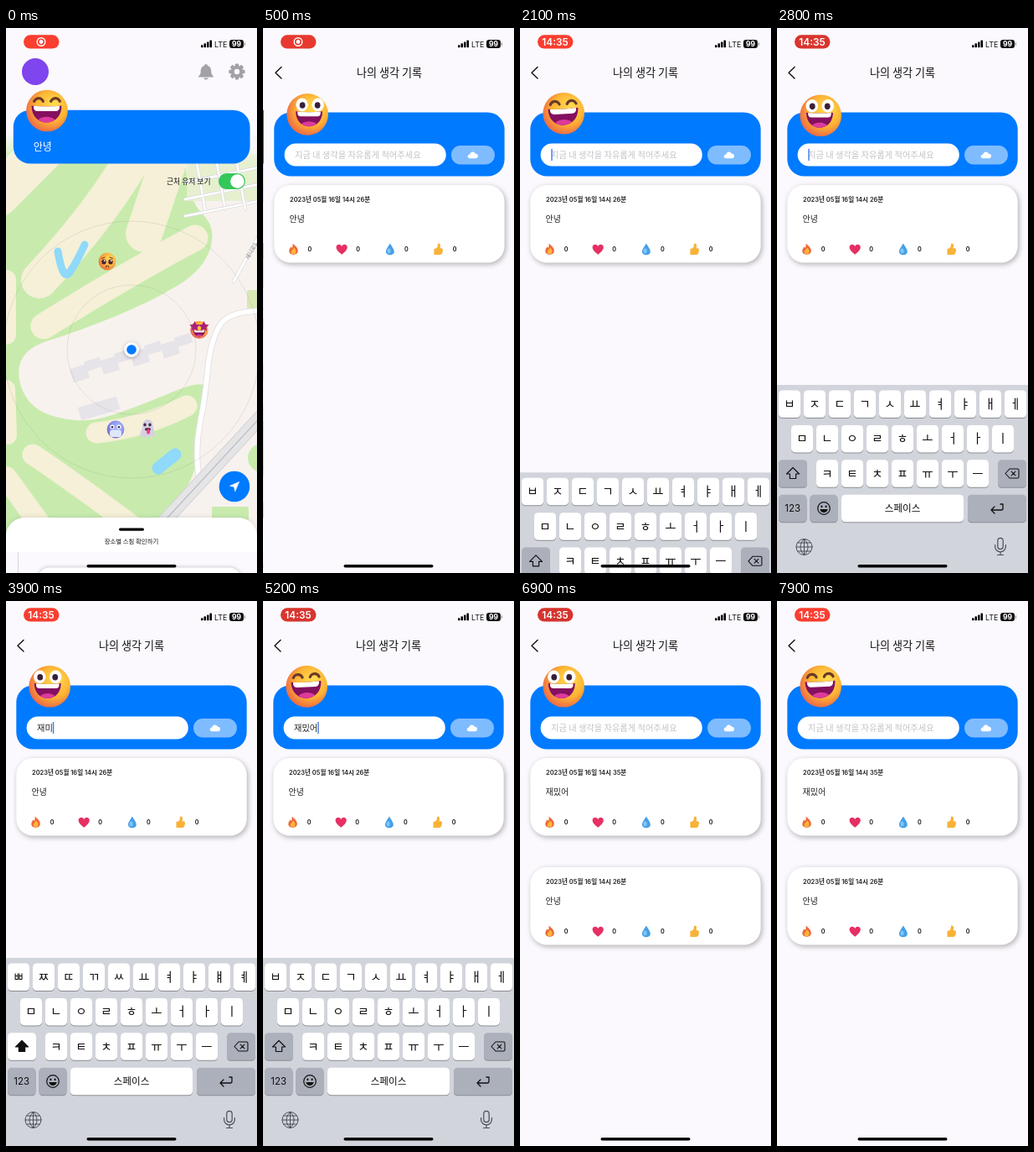
An HTML page with a canvas for the animation above (8000 ms loop, 300x649 px).

```html
<!DOCTYPE html>
<html lang="ko">
<head>
<meta charset="utf-8">
<style>
html,body{margin:0;width:100%;height:100%;overflow:hidden;background:#fbf9fd}
canvas{display:block;width:300px;height:649px}
</style>
</head>
<body>
<canvas id="stage"></canvas>
<script>
const W = 300, H = 649, LOOP = 8000, TAU = Math.PI * 2;
const BLUE = '#007aff', PAPER = '#fbf9fd', INK = '#111';
const KR = '"Noto Sans CJK KR","Noto Sans CJK",sans-serif';
const UI = 'Inter,"Noto Sans CJK KR","Noto Sans CJK",sans-serif';
const cv = document.getElementById('stage'), c = cv.getContext('2d');
const dpr = window.devicePixelRatio || 1;
cv.width = W * dpr; cv.height = H * dpr;

const smooth = v => { v = Math.max(0, Math.min(1, v)); return v * v * (3 - 2 * v); };

function rr(x, y, w, h, r, fill) {
  c.beginPath(); c.roundRect(x, y, w, h, r);
  c.fillStyle = fill; c.fill();
}
function disc(x, y, r, fill, ry = r) {
  c.beginPath(); c.ellipse(x, y, r, ry, 0, 0, TAU);
  c.fillStyle = fill; c.fill();
}
function arc(x, y, r, width, color, from = 0, to = TAU) {
  c.beginPath(); c.arc(x, y, r, from, to);
  c.lineWidth = width; c.strokeStyle = color; c.lineCap = 'round'; c.stroke();
}
function text(s, x, y, size, color = INK, weight = 400, align = 'left', fam = KR) {
  c.font = `${weight} ${size}px ${fam}`;
  c.textAlign = align; c.fillStyle = color; c.fillText(s, x, y);
}
// stroke through a few points, rounded at the inner ones
function line(pts, width, color) {
  c.beginPath(); c.moveTo(pts[0], pts[1]);
  let i = 2;
  for (; i < pts.length - 2; i += 2) {
    const x = pts[i], y = pts[i + 1], last = i === pts.length - 4, k = last ? 1 : .5;
    c.quadraticCurveTo(x, y, x + (pts[i + 2] - x) * k, y + (pts[i + 3] - y) * k);
  }
  if (pts.length === 4) c.lineTo(pts[2], pts[3]);
  c.lineWidth = width; c.strokeStyle = color; c.lineCap = c.lineJoin = 'round'; c.stroke();
}
function blob(pts, fill) {
  const n = pts.length / 2, p = i => [pts[2 * (i % n)], pts[2 * (i % n) + 1]];
  c.beginPath();
  for (let i = 0; i <= n; i++) {
    const [x, y] = p(i), [u, v] = p(i + 1), mx = (x + u) / 2, my = (y + v) / 2;
    i ? c.quadraticCurveTo(x, y, mx, my) : c.moveTo(mx, my);
  }
  c.fillStyle = fill; c.fill();
}
function path(d, fill, stroke, w = 1) {
  const p = new Path2D(d);
  if (fill) { c.fillStyle = fill; c.fill(p); }
  if (stroke) { c.strokeStyle = stroke; c.lineWidth = w; c.lineCap = c.lineJoin = 'round'; c.stroke(p); }
}
function at(x, y, draw, s = 1, rot = 0) {
  c.save(); c.translate(x, y); c.rotate(rot); c.scale(s, s); draw(); c.restore();
}
function shadow(color, blur, dx, dy, draw) {
  c.save();
  c.shadowColor = color; c.shadowBlur = blur * dpr;
  c.shadowOffsetX = dx * dpr; c.shadowOffsetY = dy * dpr;
  draw(); c.restore();
}

/* ---------- faces ---------- */
const pair = draw => [-1, 1].forEach(draw);
function ball(r, a, b, d) {
  const g = c.createRadialGradient(r * .35, -r * .35, r * .1, r * .15, -r * .15, r * 1.2);
  g.addColorStop(0, a); g.addColorStop(.6, b); g.addColorStop(1, d);
  disc(0, 0, r, g);
}
// open smile: w half width, h depth, top edge at y
function grin(x, y, w, h) {
  at(x, y, () => {
    c.beginPath(); c.moveTo(-w, 0);
    c.quadraticCurveTo(0, h * .1, w, 0);
    c.bezierCurveTo(w, h * 1.33, -w, h * 1.33, -w, 0);
    c.fillStyle = '#84105f'; c.fill(); c.clip();
    disc(0, h * .98, w * .62, '#dd3a9c', h * .32);
    rr(-w * .86, -h * .2, w * 1.72, h * .53, h * .22, '#fff');
  });
}
function laugher(x, y, open, dx, tilt) {
  at(x, y, () => {
    ball(24.8, '#ffd84c', '#fdb234', '#ee6a45');
    pair(s => {
      if (open > 0) at(dx + s * 9.5, -11.5, () => {
        c.scale(1, Math.max(.05, open));
        disc(0, 0, 7.2, '#fff', 7.8);
        disc(-s * .5, .6, 3.4, '#38203a', 3.8);
      });
      c.globalAlpha = 1 - open;
      arc(dx + s * 10, -9, 5.8, 3.2, '#6b3a28', Math.PI * 1.12, Math.PI * 1.88);
      c.globalAlpha = 1;
    });
    grin(dx * .8 - .5, open * 2.4 - 6, 18 - open * 2, 20 - open * 2);
  }, 1, tilt);
}
function star(x, y, r, fill) {
  c.beginPath();
  for (let i = 0; i < 10; i++) {
    const a = i * Math.PI / 5 - Math.PI / 2, q = i % 2 ? r * .48 : r;
    c.lineTo(x + q * Math.cos(a), y + q * Math.sin(a));
  }
  c.fillStyle = fill; c.fill();
}
function neighbours() {
  at(121, 278, () => {
    ball(10.4, '#ffd75a', '#fdb03c', '#ea6f3c');
    pair(s => {
      disc(s * 4, .4, 2.7, '#4b2436', 3);
      disc(s * 4 + .7, -.8, .9, '#fff');
      line([s * 3, -5, s * 6.5, -3.6], 1.1, '#7a3c2a');
    });
    arc(0, 7, 1.8, 1.1, '#7a2a35', Math.PI, TAU);
  });
  at(231, 359.5, () => {
    ball(10.6, '#ffd14c', '#fca63b', '#e85a55');
    grin(0, .6, 7, 7.5);
    pair(s => star(s * 5.4, -4, 6.6, '#a8207c'));
  });
  at(131, 478, () => {
    ball(10.4, '#aab6ff', '#8b95f0', '#7a68cf');
    pair(s => {
      disc(s * 4, -3, 2.6, '#fff'); disc(s * 4, -2.8, 1.3, '#3a2a55');
    });
    rr(-7, .4, 14, 8.6, 3.5, '#dfe8fb');
  });
  at(169, 477, () => {
    path('M-6-2C-6-14 7-14 7-2L9 8Q7 11 5 8Q3 12 0 9Q-3 12-5 9Q-8 11-9 8Z', '#d6d0e2');
    pair(s => disc(s * 3, -4.5, 1.7, '#43324e', 2.1));
    rr(-3, -.8, 7, 3.4, 1.7, '#59264a'); rr(-.8, .6, 3.8, 6, 1.9, '#ee3f7c');
  });
}

/* ---------- map page ---------- */
const FAIRWAYS = [
  [50, -10, 200, 50, 140], [44, 160, 140, 120, 215, 40, 300], [44, 197, 150, 165, 245],
  [31, 226, 250, 150, 290, 45, 355], [24, 0, 300, 0, 365], [22, 0, 430, 2, 485],
  [25, 108, 482, 165, 476, 216, 450], [25, 32, 508, 80, 540, 150, 592], [26, 0, 535, 40, 590]
];
const CAMPUS = [212, 130, 218, 205, 252, 238, 236, 288, 175, 325, 90, 360, 10, 385, 22, 452, 90, 472, 150, 454, 250, 412, 230, 470, 228, 540, 160, 610, 340, 640, 340, 120];

function road(pts, w) {
  line(pts, w + 1.6, '#dedbdf'); line(pts, w, '#fff');
}
function land() {
  c.fillStyle = '#c8ebad'; c.fillRect(0, 0, W, H);
  for (const [w, ...pts] of FAIRWAYS) line(pts, w, '#f5f0d7');
  blob(CAMPUS, '#f8f2ee');
  line([62, 266, 68, 302, 84, 280, 94, 258], 9, '#8fd9fa');
  line([182, 524, 202, 508], 15, '#8fd9fa');
  // park with paths in the corner
  c.fillStyle = '#e6f0cf'; c.fillRect(216, 150, 84, 56);
  for (let i = 0; i < 3; i++) {
    road([214, 184 + 20 * i, 302, 166 + 20 * i], 2.4);
    road([226 + 24 * i, 150, 238 + 24 * i, 216], 2.4);
  }
  road([302, 248, 272, 302], 3);
  rr(288, 312, 20, 25, 3, '#d7e8b5'); rr(246, 570, 44, 20, 2, '#c8ebad');
  disc(306, 512, 17, '#c8ebad');
  // wings of one long building
  for (let i = 0; i < 8; i++)
    at(87 + 18 * i, 408 - 4.8 * i, () => rr(-10, i % 2 ? -9 : -5, 20, i % 2 ? 12 : 17, 1, '#e6e4e9'), 1, -.3);
  at(111, 453, () => rr(-24, -8, 48, 16, 1, '#e6e4e9'), 1, -.28);
  road([310, 337, 266, 336, 244, 374, 238, 440, 226, 500, 230, 532], 6);
  const rail = [180, 597, 312, 455];
  line(rail, 17, '#d3d2d5'); line(rail, 15, '#e5e4e6'); line(rail, 1.2, '#bdbcc1');
  at(290, 276, () => text('새늬로5', 0, 0, 6.5, '#77757c'), 1, -1.05);
}
function bell() {
  path('M0-9C1.4-9 1.8-8 1.8-7.2C5.5-6 6.3-3 6.3 0C6.3 3 7.5 4 9 5.8V6.6H-9V5.8C-7.5 4-6.3 3-6.3 0C-6.3-3-5.5-6-1.8-7.2C-1.8-8-1.4-9 0-9ZM-3 7.6H3C2.4 10-2.4 10-3 7.6Z', '#a2a1a6');
}
function gear() {
  for (let i = 0; i < 8; i++) at(0, 0, () => rr(-2.2, -9.6, 4.4, 6, 1, '#a2a1a6'), 1, i * Math.PI / 4);
  disc(0, 0, 7.3, '#a2a1a6'); disc(0, 0, 3.2, PAPER);
}
function mapPage(t) {
  land();
  const g = c.createLinearGradient(0, 125, 0, 162);
  g.addColorStop(0, PAPER); g.addColorStop(1, 'rgba(251,249,253,0)');
  c.fillStyle = g; c.fillRect(0, 0, W, 162);
  for (const r of [77, 153]) arc(150, 383, r, 1, 'rgba(120,120,120,.16)');
  neighbours();
  shadow('rgba(0,0,0,.3)', 4, 0, 1, () => disc(150, 383, 9, '#fff'));
  disc(150, 383, 5.8, BLUE);
  disc(35, 52, 16, '#7f45ee');
  at(239, 52, bell); at(276, 52, gear);
  rr(8.8, 97.7, 282.8, 63.8, 20, BLUE);
  text('안녕', 32.8, 146, 12, '#fff', 500);
  laugher(49, 98.5 + Math.sin(t / 160) * .6, 0, 0, 0);
  text('근처 유저 보기', 244.5, 186, 8.8, INK, 500, 'right');
  rr(254, 173, 32, 19, 9.5, '#34c759'); disc(276.5, 182.5, 8.3, '#fff');
  disc(273, 546, 18.3, BLUE);
  path('M278.5 540.5L267.5 545.3L272.6 546.4L273.8 551.5Z', '#fff', '#fff', .6);
  shadow('rgba(0,0,0,.1)', 4, 0, -1, () => rr(0, 583, W, 80, 22, '#fff'));
  rr(135, 595.5, 30, 3.2, 1.6, '#000');
  text('장소별 스침 확인하기', 150, 614, 7.4, INK, 500, 'center');
  c.fillStyle = PAPER; c.fillRect(0, 624, W, 25);
  c.fillStyle = '#d8d6da'; c.fillRect(14, 624, 1, 25);
  shadow('rgba(0,0,0,.28)', 4, 0, 0, () => rr(38, 642.5, 243, 40, 14, '#fff'));
}

/* ---------- diary page ---------- */
const icons = [
  () => {
    path('M-1-7C3-4 6-1 5.5 3C5 8-5 8-5.5 3C-5.7 0-4-2-3-3.5L-2-1.5C-.5-3-1-5-1-7Z', '#ee6836');
    path('M.5-2C3 0 3.6 2.5 3 4.2C2 7-3 7-3 3.5C-3 1.5-1.5 1.5.5-2Z', '#fdb43f');
  },
  () => path('M0 6.6C-4 3.4-7 .5-7-2.4C-7-6.4-1.8-7.4 0-3.6C1.8-7.4 7-6.4 7-2.4C7 .5 4 3.4 0 6.6Z', '#e62f62'),
  () => {
    path('M0-7.4C2-3.8 5.2 0 5.2 2.8C5.2 8.4-5.2 8.4-5.2 2.8C-5.2 0-2-3.8 0-7.4Z', '#489fe6');
    disc(-1.4, 2, 2.2, '#7cc6f8', 3);
  },
  () => path('M-5.4-.4L-2.4-1.4C-1-3-.6-4.5-.7-6.4C-.7-8 2.6-7.4 2.6-4.8C2.6-3.2 2.2-2 2-1.4H4.6C6.4-1 6 5.6 2.6 6.8H-5.4Z', '#f8b238')
];
// card margin shared by everything on this page
const card = (y, h, fill) => rr(12.3, y, 275.4, h, 20, fill);

function entry(y, time, body) {
  shadow('rgba(0,0,0,.3)', 6, 1.5, 2, () => card(y, 92.5, '#fff'));
  text(`2023년 05월 16일 ${time}`, 31, y + 19.7, 7.5, '#222', 600, 'left', UI);
  text(body, 30.5, y + 43.7, 10, '#222');
  icons.forEach((draw, i) => {
    at(35.5 + 57.7 * i, y + 76.5, draw, .95);
    text('0', 55 + 57.7 * i, y + 79, 7.2, INK, 600, 'center', UI);
  });
}
// three second cycle: looks around with open eyes, laughs, dips and reopens
function mood(t) {
  const p = ((t + 2500) / 1000) % 3;
  const open = 1 - smooth((p - .75) / .15) + smooth((p - 2) / .15);
  const dip = ((1 + Math.cos(TAU * (p - 2.5) / 3)) / 2) ** 3;
  laugher(52.2, 101.6 + 3 * dip, open, 3 * open * Math.cos(TAU * p), -.05 * (1 - open));
}
const KEYS = [...'ㅈㅐㅁㅣㅆㅇㅓ'];
const WORDS = ['', 'ㅈ', '재', '잼', '재미', '재밌', '재밌ㅇ', '재밌어'];
const SHIFT = [3750, 4080], SENT = 6200, POSTED = 6500;
const keyTime = i => 2900 + 200 * i + (i > 3 ? 300 : 0);

function diaryPage(t) {
  c.fillStyle = PAPER; c.fillRect(0, 0, W, H);
  path('M21 46.5L14 53.3L21 60', null, INK, 1.4);
  text('나의 생각 기록', 150, 57.7, 13.1, INK, 400, 'center');
  card(100.6, 76, BLUE);
  rr(24.6, 137.5, 193.2, 27, 13.5, '#fff');
  rr(224, 140, 52, 22.5, 11.2, '#7fbcff');
  at(250, 151.5, () => path('M-4 4C-8 4-7.5-1-4-1C-3.5-5.5 2.5-5.5 3.2-1.8C7.5-2.2 7.5 4 4 4Z', '#fff'), .92);
  mood(t);
  const value = t < SENT ? WORDS[KEYS.filter((_, i) => keyTime(i) <= t).length] : '';
  text(value || '지금 내 생각을 자유롭게 적어주세요', 37, 154.8, 10.25, value ? '#222' : '#c3c3c8');
  const typing = t > 2850 && t < 4700;
  if (t >= 1700 && t < SENT && (typing || (t - 1600) % 1000 < 650)) {
    const x = value ? 37 + c.measureText(value).width : 37.3;
    c.fillStyle = '#3f78e8'; c.fillRect(x, 144, 1.4, 14);
  }
  const posted = t >= POSTED;
  if (posted) entry(187, '14시 35분', '재밌어');
  entry(posted ? 317 : 187, '14시 26분', '안녕');
}

/* ---------- keyboard ---------- */
const ROWS = ['ㅂㅈㄷㄱㅅㅛㅕㅑㅐㅔ', 'ㅁㄴㅇㄹㅎㅗㅓㅏㅣ', 'ㅋㅌㅊㅍㅠㅜㅡ'];
const SHIFTED = 'ㅃㅉㄸㄲㅆㅛㅕㅑㅒㅖ';
const rowY = r => 431.5 + 41.4 * r;
function key(x, r, w, fill = '#fff') {
  rr(x, rowY(r) + 1, w, 32.5, 4.5, '#8b8d93');
  rr(x, rowY(r), w, 32.5, 4.5, fill);
}
function keyboard(t) {
  const GREY = '#abb0bb', DIM = '#4c4f56';
  c.fillStyle = '#d1d4db'; c.fillRect(0, 425, W, 320);
  const up = t >= SHIFT[0] && t < SHIFT[1];
  const hit = KEYS.find((_, i) => t >= keyTime(i) && t < keyTime(i) + 100);
  let pop = null;
  ROWS.forEach((row, r) => [...(up && !r ? SHIFTED : row)].forEach((ch, i) => {
    const x = [15, 30, 60][r] + 30 * i, y = rowY(r);
    key(x - 13, r, 26);
    text(ch, x, y + 21.5, 14.5, INK, 400, 'center');
    if (hit === ch) pop = [ch, x, y];
  }));
  key(2, 2, 34, up ? '#fff' : GREY);
  at(19, 530.5, () => path('M0-7L7.5 .5H3.6V6H-3.6V.5H-7.5Z', up ? INK : null, INK, 1.2));
  key(264, 2, 34, GREY);
  at(281, 530.5, () => path('M-8 0L-3-5.5H6.5Q8-5.5 8-4V4Q8 5.5 6.5 5.5H-3ZM-.8-2.4L4 2.4M-.8 2.4L4-2.4', null, INK, 1.1));
  key(2, 3, 33.5, GREY); text('123', 18.7, 576, 11.5, INK, 400, 'center', UI);
  key(39.5, 3, 33, GREY);
  at(56, 572, () => {
    arc(0, 0, 7.3, 1.2, INK);
    pair(s => disc(s * 2.6, -2.2, 1.1, INK, 1.4));
    path('M-4.6 1H4.6C4 6.4-4 6.4-4.6 1Z', INK);
  });
  key(77, 3, 146); text('스페이스', 150, 575.5, 11.6, INK, 400, 'center');
  key(228, 3, 70, GREY);
  at(263, 572, () => path('M-7 2H5Q7 2 7 0V-5H4M-7 2L-3-2M-7 2L-3 6', null, INK, 1.3));
  at(32.5, 618, () => {
    arc(0, 0, 9.5, 1, DIM);
    path('M-9.5 0H9.5M0-9.5V9.5M0-9.5C-6-4-6 4 0 9.5C6 4 6-4 0-9.5M-7.8-5H7.8M-7.8 5H7.8', null, DIM);
  });
  at(267, 617.5, () => path('M-3.2-7A3.2 3.2 0 0 1 3.2-7V0A3.2 3.2 0 0 1-3.2 0ZM-6.4-2V0A6.4 6.4 0 0 0 6.4 0V-2M0 6.4V10M-3.5 10H3.5', null, DIM, 1.2));
  if (pop) {
    const [ch, x, y] = pop, px = Math.max(2, Math.min(W - 42, x - 20));
    shadow('rgba(0,0,0,.3)', 3, 0, 1, () => rr(px, y - 43, 40, 42, 8, '#fff'));
    rr(x - 13, y - 8, 26, 40, 5, '#fff');
    text(ch, px + 20, y - 14, 22, INK, 400, 'center');
  }
}

/* ---------- system chrome ---------- */
function chrome(t) {
  const k = (1 + Math.cos(t * Math.PI / 1000)) / 2;
  rr(21, 8.3, 42.5, 16.3, 8.2, `rgb(${212 + 38 * k},${52 + 10 * k},${46 + 2 * k})`);
  if (t < 1300) {
    arc(42, 16.5, 4.8, 1.4, '#fff'); disc(42, 16.5, 2.4, '#fff');
  } else text('14:35', 42, 20.9, 11.8, '#fff', 600, 'center', UI);
  for (let i = 0; i < 4; i++) rr(233 + 3.5 * i, 20.2 - 1.9 * i, 2.5, 3 + 1.9 * i, .8, '#000');
  text('LTE', 249, 22.8, 9, INK, 400, 'left', UI);
  rr(267, 14, 17, 10, 3, INK); rr(284.7, 17.2, 1.2, 3.6, .6, '#888');
  text('99', 275.5, 22.2, 8.6, '#fff', 700, 'center', UI);
  rr(96.5, 639, 107, 3.6, 1.8, '#000');
}

function draw(t) {
  c.setTransform(dpr, 0, 0, dpr, 0, 0);
  // critically damped push of the second page
  const k = Math.max(0, t - 80) / 53;
  const off = t > 900 ? 0 : W * (1 + k) * Math.exp(-k);
  if (off > 0) at(-.3 * (W - off), 0, () => mapPage(t));
  if (off < W) at(off, 0, () => diaryPage(t));
  const rise = smooth((t - 1850) / 480) - smooth((t - 6120) / 430);
  if (rise > 0) at(0, 224 * (1 - rise), () => keyboard(t));
  chrome(t);
}

const start = performance.now();
function tick(now) {
  draw(Math.max(0, now - start) % LOOP);
  requestAnimationFrame(tick);
}
requestAnimationFrame(tick);
</script>
</body>
</html>
```
